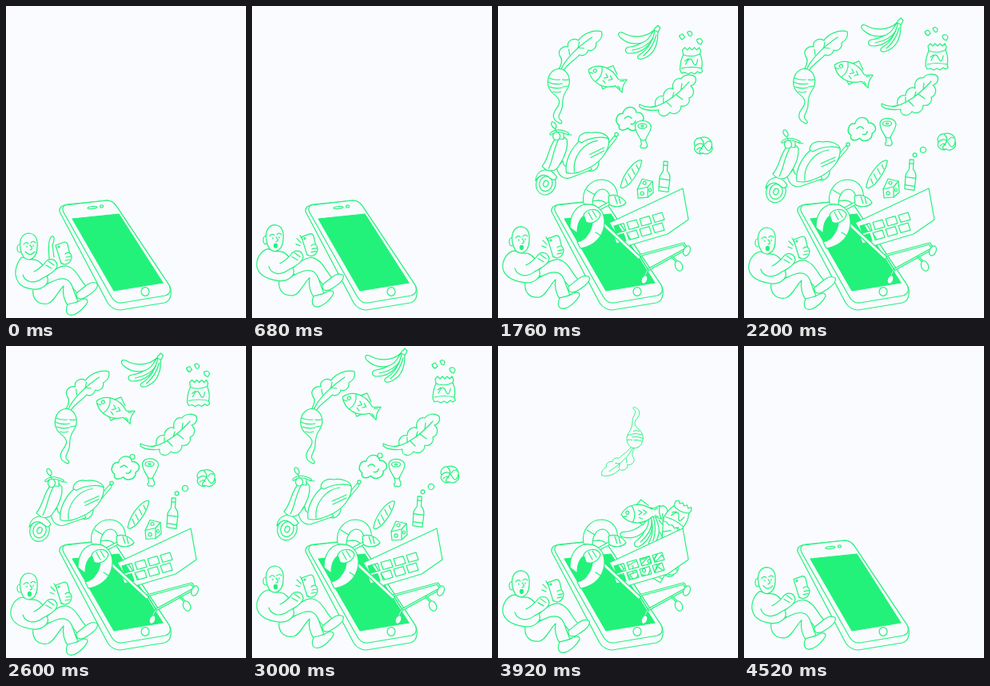
An HTML page with a canvas that plays this animation: 300x390 px, repeating every 4.56 s.

```html
<!DOCTYPE html>
<html lang="en">
<head>
<meta charset="utf-8">
<title>Shopping by phone</title>
<style>
html, body { margin: 0; width: 100%; height: 100%; overflow: hidden; background: #f9fbff; }
canvas { display: block; width: 300px; height: 390px; }
</style>
</head>
<body>
<canvas id="stage"></canvas>
<script>
const GREEN = '#22f27a', PAPER = '#f9fbff', LOOP = 4560;
const canvas = document.getElementById('stage');
const ctx = canvas.getContext('2d');
const dpr = window.devicePixelRatio || 1;
canvas.width = 300 * dpr;
canvas.height = 390 * dpr;

const clamp = v => Math.max(0, Math.min(1, v));
const span = (t, start, length) => clamp((t - start) / length);
const lerp = (a, b, p) => a + (b - a) * p;
const smooth = p => p * p * (3 - 2 * p);
const easeOut = p => 1 - (1 - p) * (1 - p);

function shape(d, fill = PAPER) {
  const path = new Path2D(d);
  ctx.fillStyle = fill;
  ctx.fill(path);
  ctx.stroke(path);
}
function line(d) {
  ctx.stroke(new Path2D(d));
}
function oval(x, y, rx, ry = rx, turn = 0, fill = PAPER) {
  ctx.beginPath();
  ctx.ellipse(x, y, rx, ry, turn, 0, Math.PI * 2);
  ctx.fillStyle = fill;
  ctx.fill();
  ctx.stroke();
}
function tube(d, width) {
  const path = new Path2D(d);
  ctx.save();
  ctx.lineWidth = width;
  ctx.stroke(path);
  ctx.lineWidth = width - 2.2;
  ctx.strokeStyle = PAPER;
  ctx.stroke(path);
  ctx.restore();
}
function at(x, y, turn, scale, draw) {
  ctx.save();
  ctx.translate(x, y);
  ctx.rotate(turn);
  ctx.scale(scale, scale);
  draw();
  ctx.restore();
}

function phone() {
  shape('M67,257C66,252 70,249 76,248L126,243Q133,243 138,250L204,349Q207,354 206,361Q205,369 198,371L143,380Q133,380 127,371Z');
  shape('M74,249L126,243Q133,243 138,250L204,349Q208,359 199,362L145,371Q137,372 132,364L72,258Q69,251 74,249Z');
  shape('M83,266L141,260L196,346L135,356Z', GREEN);
  oval(108, 252, 6, 1.5, -0.1);
  oval(119.5, 250.5, 2, 1.6);
  oval(174, 357, 5, 5.3);
}

// Height of the seated figure: eased swings between rest points.
const SWAY = [[0, 0], [650, -10.5], [1300, 1], [1950, -10.5], [2600, 0], [3100, -10], [3700, 1], [4200, -9], [4950, -5]];
function sway(t) {
  const i = SWAY.findIndex(k => k[0] > t);
  const [t0, a] = SWAY[i - 1], [t1, b] = SWAY[i];
  return lerp(a, b, smooth((t - t0) / (t1 - t0)));
}

function person(t) {
  const amazed = t > 560 && t < 4260;
  const b = 11 - 6 * smooth(span(t, 250, 350)) + 4 * smooth(span(t, 4150, 350));
  ctx.save();
  ctx.translate(0, sway(t));
  shape('M44,346C54,334 66,324 76,325C88,328 92,342 100,350L89,359C84,352 78,346 72,346Z');
  shape('M88,359C87,367 94,368 101,363C109,358 116,352 114,347C108,343 102,348 98,351Z');
  shape('M34,353C32,366 40,374 52,372C60,370 64,358 72,350C70,360 74,370 78,376L90,369C84,358 84,346 76,342C66,338 56,346 46,350Z');
  shape('M77,373C73,383 77,388 84,386C91,384 99,376 102,370C102,364 96,366 89,370Z');
  shape(`M20,314C${b + 6},316 ${b},326 ${b + 1},336C${b + 3},346 18,352 34,354C46,355 54,347 52,340L46,324C40,316 34,317 30,317Z`);
  oval(17, 303, 3, 5);
  shape('M18,303C16,291 21,284 29,284C37,285 40,292 39,302C39,310 35,316 29,317C23,317 19,311 18,303Z');
  line('M22,298Q25,294 28,297M31,296Q34,293 37,296M26,300v1.5M34,299v1.5M30,299Q35,304 30,305');
  if (amazed) oval(29.5, 310, 2, 2.6, 0, GREEN);
  else line('M24,307Q30,314 36,307');
  shape('M62,299L73,295Q76,295 77,298L81,315L69,322Z');
  oval(66, 301, 1);
  shape('M74,310C79,305 84,311 81,318C78,324 72,324 69,321');
  line('M75,314l6,-1M74,318l6,-1');
  shape('M21,336C24,346 36,348 46,340C54,336 64,330 64,324C62,314 52,315 48,322C44,326 40,330 35,332');
  line('M53,319l7,5M50,324l7,4');
  if (t < 560 && Math.cos(t / 560 * Math.PI * 4) > 0)
    shape('M54,316C53,300 53,292 57,288C61,287 61,292 58,299L60,314');
  if (amazed) line('M56,301l5,5M60,297l3,5M55,308l5,2');
  ctx.restore();
}

const CELLS = [0, 1, 2, 3].flatMap(c => [0, 1].map(r =>
  `M${145 + c * 16} ${275 - c * 4.5 + r * 13}l12,-3.4l3,9l-12,3.4Z`)).join('');

function cartBack() {
  tube('M176,312L232,297L236,303L187,330Z', 3.2);
  tube('M187,330L183,338M218,314L225,321', 3);
  oval(183, 342, 3.6, 5.5, 0.4);
  oval(226, 325, 4.4, 6.5, -0.4);
  oval(236, 306, 4, 6.5, 0.4);
}

function cartFront() {
  const side = new Path2D('M139,271L231,228L238,267L212,285L158,301Z' + CELLS);
  ctx.fillStyle = PAPER;
  ctx.fill(side, 'evenodd');
  ctx.stroke(side);
  tube('M117,259L176,314', 5.2);
  tube('M114,260L148,242', 4.4);
}

function arms() {
  shape('M107,247C104,230 115,217 130,217C145,218 151,230 149,243L140,246C141,236 137,229 130,229C121,230 118,240 118,249Z');
  shape('M138,238C144,234 156,238 160,246C155,252 144,252 139,248Z');
  line('M146,238l3,9M151,239l2,8M111,230l10,6');
  shape('M103,303C122,300 134,286 133,268C132,254 122,247 110,248C98,249 90,260 90,277L99,284C99,268 106,260 113,262C121,265 118,278 112,286C109,291 104,294 99,295Z');
  shape('M107,261C111,253 124,252 128,260C127,268 117,274 110,270Z');
  line('M113,258l5,9M118,256l5,8M122,283L130,288');
}

const draw = {
  radish() {
    shape('M0,-15C4,-22 6,-28 2,-32C-2,-40 6,-46 12,-44C10,-52 20,-56 25,-52C30,-60 44,-66 54,-63C56,-56 52,-52 47,-49C48,-42 42,-38 37,-40C36,-34 30,-32 26,-34C22,-28 12,-24 6,-14Z');
    line('M3,-15C8,-28 24,-44 42,-56M14,-34l-1,-7M25,-44l1,-6M24,-43l8,1');
    shape('M-5,-15C-14,-10 -16,4 -9,12C-5,17 0,18 1,24C2,32 -8,35 -6,44C-5,50 0,50 2,52C5,52 5,49 2,47C-3,43 5,37 5,29C5,22 6,17 9,12C16,3 15,-8 8,-14C4,-17 -1,-17 -5,-15Z');
    line('M-12,-5Q-5,-2 2,-3M-13,0Q-5,4 5,2M13,-3Q8,-2 5,-3M-11,6Q-3,9 5,7M12,5l-6,1M-7,12Q-2,14 3,12');
  },
  fish() {
    shape('M-6,-10L1,-17L10,-9M-4,10L1,15L7,8');
    shape('M-25,0C-18,-13 0,-15 14,-4L24,-8C22,-2 22,3 25,9L14,5C2,15 -16,14 -25,0Z');
    line('M-11,-10Q-5,0 -11,10M-23,3l5,-1M-3,-4l4,3l-4,3M3,-4l4,3l-4,3M-3,5l4,2M17,-3l4,-2M17,4l4,2');
    oval(-17, -2, 2);
  },
  banana() {
    shape('M20,-18L24,-22L27,-19L24,-13C24,4 18,16 4,20C-2,21 -3,17 2,14C12,8 18,-4 20,-18Z');
    shape('M20,-14C16,4 4,13 -12,13C-18,12 -18,6 -12,5C0,4 12,-4 19,-16Z');
    shape('M19,-16C8,-6 -8,-6 -20,-13C-26,-15 -27,-10 -22,-6C-12,3 6,4 14,-8Z');
    line('M19,-16l5,2M-8,9Q10,6 18,-6M6,16Q18,6 22,-10');
  },
  chips(t) {
    shape('M-11,-14l3,-3l3,3l3,-3l3,3l3,-3l3,3l3,-3l2,4l-1,4Q15,0 13,9l1,4l-3,2l-3,-2l-4,3l-4,-2l-4,2l-4,-2l-4,1l-2,-4Q-14,0 -10,-8Z');
    line('M-10,-8Q0,-4 11,-9M-12,9Q0,6 13,9M-7,4Q-2,-8 2,1T8,-2M-8,0l4,-3');
    if (t > 1700 && t < 3500) {
      shape('M-15,-32l4,-2l3,4l-3,3Q-14,-28 -15,-32Z');
      shape('M-5,-36q4,-3 6,1q0,5 -4,3Z');
      shape('M7,-27q5,-3 7,2l-2,4q-5,-1 -5,-6Z');
    }
  },
  leaf() {
    shape('M-34,10C-26,14 -18,14 -14,12C-16,4 -10,-2 -4,0C-4,-8 4,-12 8,-9C6,-18 12,-24 18,-22C22,-28 32,-28 36,-24C38,-18 34,-14 30,-13C36,-8 34,0 28,2C30,8 24,14 18,12C18,20 10,24 4,20C-2,28 -12,24 -10,17C-18,18 -28,18 -34,13Z');
    line('M-20,14C-6,12 12,0 28,-18M-4,9V2M7,2L9,-5M0,7L6,13M12,-2L20,4M18,-8l1,-8');
  },
  ham() {
    shape('M-10,-9C-10,-18 9,-18 10,-8C9,0 4,3 3,9L5,14C6,18 2,20 0,18C-3,20 -5,16 -2,14L-3,8C-6,2 -10,-2 -10,-9Z');
    oval(-1, -9, 5.5, 3);
    oval(-1, -9, 1.5, 1);
    line('M-3,8Q0,10 3,8');
  },
  bread() {
    shape('M-21,-2Q-8,-8 10,-5Q22,-2 21,2Q8,8 -12,5Q-23,2 -21,-2Z');
    line('M-13,3l4,-6M-6,4l4,-7M2,4l4,-7M10,4l3,-5');
  },
  cheese() {
    shape('M-10,1L-4,-12L9,-9L10,5L3,11L-9,12Z');
    line('M-10,1L3,-2L9,-9M3,-2V11');
    oval(-4, 6, 2.2);
    oval(-1, -7, 2);
    oval(6, 2, 1.5, 2);
  },
  bottle(t) {
    shape('M-2,-19L3,-19L3,-7C7,-4 7,0 7,4L6,19L-6,18L-6,2C-6,-2 -3,-4 -2,-7Z');
    line('M-2,-14h5M-6,3L7,4M-6,13L6,14');
    if (t > 1850 && t < 3400) {
      oval(4, -25, 2.4);
      oval(14, -32, 3.6);
    }
  },
  roll() {
    shape('M-3,-10C4,-13 12,-8 11,0C14,7 5,12 0,9C-6,12 -13,6 -10,0C-13,-5 -8,-11 -3,-10Z');
    line('M-10,0Q-2,-7 3,2T11,0M-3,-10Q4,-4 -2,3T0,9M2,-2Q6,-8 9,-5M-8,5Q-4,0 -1,4');
  }
};

// x/y with dx/dy: hover place and slow travel; go/back: launch and fall times.
const ITEMS = [
  { name: 'leaf', x: 206, y: 112, dx: -8, dy: 0, go: 930, rise: 900, bulge: 25, back: 3520, spin: -0.9, endX: 200 },
  { name: 'banana', x: 172, y: 37, dx: -5, dy: -12, go: 960, rise: 900, bulge: 20, back: 3510, spin: -0.6, endX: 182 },
  { name: 'chips', x: 241, y: 64, dx: -1, dy: -9, go: 780, rise: 800, bulge: 16, back: 3540, spin: 0.6, endX: 222 },
  { name: 'fish', x: 136, y: 84, dx: 0, dy: -10, turn: 0.42, go: 890, rise: 900, bulge: -6, back: 3550, spin: -0.6, endX: 188 },
  { name: 'ham', x: 180, y: 156, dx: 1, dy: 1, go: 1020, rise: 900, bulge: 14, back: 3430, spin: 0.8, endX: 180 },
  { name: 'roll', x: 253, y: 170, dx: -6, dy: -9, go: 780, rise: 600, bulge: 8, back: 3430, spin: 1, endX: 214 },
  { name: 'bread', x: 166, y: 210, dx: -1, dy: 1, turn: -0.98, go: 930, rise: 900, bulge: -8, back: 3380, spin: 0.5, endX: 172 },
  { name: 'bottle', x: 208, y: 211, dx: 0, dy: -4, turn: 0.06, go: 900, rise: 800, bulge: -4, back: 3400, spin: 0.4, endX: 206 },
  { name: 'cheese', x: 184, y: 228, dx: 0, dy: 3, turn: 0, go: 1280, rise: 600, bulge: 0, back: 3400, spin: 0.3, endX: 188 },
  { name: 'radish', x: 75, y: 95, dx: -1, dy: 0, go: 760, rise: 570, bulge: -10, back: 3450, fall: 700, lift: 70, shrink: 0.37, spin: 4.7, endX: 219 }
];

function item(o, t) {
  if (t < o.go) return;
  const p = easeOut(span(t, o.go, o.rise));
  const age = (Math.min(t, o.back) - 2200) / 800 * p;
  const hoverX = o.x + o.dx * age, hoverY = o.y + o.dy * age;
  const u = span(t, o.back, o.fall || 450);
  const x = lerp(lerp(188, hoverX, p) + o.bulge * 4 * p * (1 - p), o.endX, u);
  const y = lerp(lerp(272, hoverY, p), 276, u * u) - (o.lift || 0) * 4 * u * (1 - u);
  const size = lerp(0.45, 1, clamp(p * 2)) * (1 - (o.shrink || 0) * u);
  at(x, y, (o.turn || 0) + o.spin * u, size, () => draw[o.name](t));
}

function scooterBody(t) {
  tube('M22,6L40,-8L56,-27', 5);
  oval(25, 3, 10, 11, 0.3);
  shape('M-18,8C-16,20 -8,24 0,21L26,12L20,2L-2,8C-8,8 -10,4 -10,0Z');
  shape('M-6,15C-8,2 0,-16 14,-26C26,-34 42,-34 48,-26C50,-14 40,0 26,8C14,14 4,18 -6,15Z');
  line('M4,14C2,-4 16,-22 34,-24M24,-7l18,-8M25,-3l17,-8');
  shape('M10,-24C10,-32 18,-36 26,-34C36,-36 46,-32 48,-26C40,-30 24,-28 14,-22Z');
  oval(-32, 28, 12, 14, 0.35);
  oval(-32, 28, 8, 9.5, 0.35);
  oval(-32, 28, 3, 4, 0.35);
  shape('M-45,24C-43,9 -27,5 -18,20C-21,26 -25,23 -29,19C-35,15 -41,18 -45,24Z');
  shape('M-17,-30C-28,-18 -26,-6 -36,6C-30,14 -20,14 -15,6C-8,-4 -3,-16 -4,-26C-8,-32 -12,-32 -17,-30Z');
  line('M-14,-28C-22,-14 -22,-2 -28,9');
  shape('M-18,-28L-16,-38L-8,-37L-8,-27Z');
  tube('M-24,-34Q-16,-41 -3,-34', 3.6);
  oval(-17, -31, 4.5, 5);
  line('M-17,-37l-2,-5M-4,-33l6,1');
  oval(-20, -45, 2.5, 4.5, -0.5);
  at(75, -46, 0, 1.2, () => {
    shape('M-11,3C-17,-1 -13,-10 -7,-9C-5,-18 7,-17 7,-10C15,-10 17,-2 11,1C11,9 1,11 -2,6C-7,10 -13,8 -11,3Z');
    line('M-5,-4Q-1,-8 2,-4M1,2q4,1 5,-3');
  });
  oval(58, -31, 2.2);
  if (t > 2500) oval(84, -64, 3);
}

function scooter(t) {
  if (t < 1050 || t > 3900) return;
  const p = easeOut(span(t, 1050, 950));
  const out = span(t, 3380, 500);
  const drift = (t - 2200) / 800 * p;
  const x = lerp(lerp(405, 72, p) + 4 * drift, 400, out * out);
  const y = lerp(lerp(10, 204, p) - 3 * drift, 25, out * out);
  at(x, y, -0.45 * (1 - p), 1, () => scooterBody(t));
}

function backOut(p) {
  const q = p - 1;
  return 1 + 2 * q * q * q + q * q;
}

function render(t) {
  ctx.setTransform(dpr, 0, 0, dpr, 0, 0);
  ctx.fillStyle = PAPER;
  ctx.fillRect(0, 0, 300, 390);
  ctx.strokeStyle = GREEN;
  ctx.lineWidth = 1.2;
  ctx.lineJoin = ctx.lineCap = 'round';
  phone();
  scooter(t);
  const leave = span(t, 4140, 350);
  const k = backOut(span(t, 710, 380)) * (1 - leave * leave);
  if (t > 710 && k > 0.01) {
    ctx.save();
    ctx.translate(138, 312);
    ctx.scale(k, k);
    ctx.translate(-138, -312);
    cartBack();
    ITEMS.forEach(o => item(o, t));
    cartFront();
    arms();
    ctx.restore();
  }
  person(t);
}

const began = performance.now();
function tick() {
  render((performance.now() - began) % LOOP);
  requestAnimationFrame(tick);
}
tick();
</script>
</body>
</html>
```
